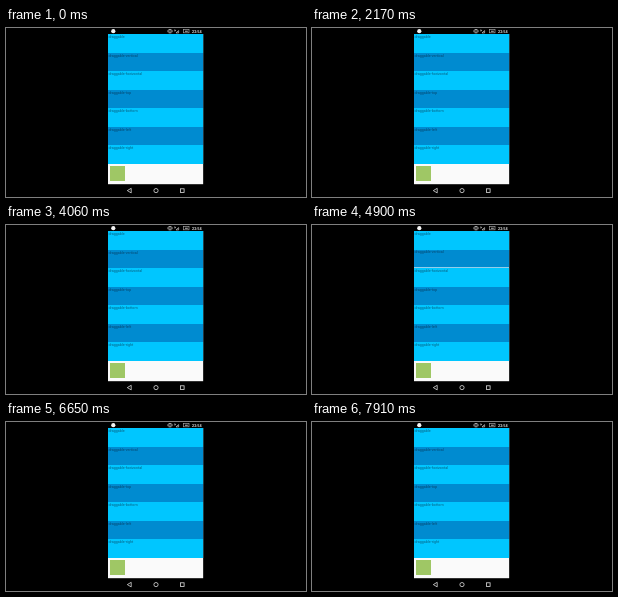
These frames come from a looping animation (300x169 px, 8000 ms). An HTML page with a canvas:

```html
<!DOCTYPE html>
<html lang="en">
<head>
<meta charset="utf-8">
<title>Draggable rows</title>
<style>
html, body { margin: 0; width: 100%; height: 100%; overflow: hidden; background: #000; }
canvas { display: block; width: 300px; height: 169px; }
</style>
</head>
<body>
<canvas id="stage"></canvas>
<script>
const LOOP = 8000;
const LEFT = 102, WIDTH = 95.4, TOP = 6, BOTTOM = 156.4;
const LIGHT = '#00c6ff', DARK = '#008bd0';
const labels = ['', '-vertical', '-horizontal', '-top', '-bottom', '-left', '-right']
  .map(s => 'draggable' + s);

// Drag paths per row: [time, dx, dy]
const drags = {
  0: [[2870, 0, 0], [3080, 13, -0.3], [3290, 29.5, -0.7], [3430, 24, -0.5], [3700, 0, 0]],
  1: [[4760, 0, 0], [4900, 0, -0.6], [5040, 0, 0]]
};

const canvas = document.getElementById('stage');
const ctx = canvas.getContext('2d');
const scale = window.devicePixelRatio || 1;
canvas.width = Math.round(300 * scale);
canvas.height = Math.round(169 * scale);

// Whole-pixel row edges keep the seams crisp
const edge = i => Math.round(6.2 + i * 18.5);

function rect(x, y, w, h, color) {
  ctx.fillStyle = color;
  ctx.fillRect(x, y, w, h);
}

function line(points, closed) {
  ctx.beginPath();
  points.forEach(([x, y]) => ctx.lineTo(x, y));
  if (closed) ctx.closePath();
  ctx.stroke();
}

function circle(x, y, r) {
  ctx.beginPath();
  ctx.arc(x, y, r, 0, Math.PI * 2);
}

function text(str, x, y, size, color, weight = 400) {
  ctx.font = `${weight} ${size}px Roboto, Arial, sans-serif`;
  ctx.fillStyle = color;
  ctx.fillText(str, x, y);
}

function offset(path, t) {
  if (!path) return [0, 0];
  for (let i = 1; i < path.length; i++) {
    const [t0, x0, y0] = path[i - 1], [t1, x1, y1] = path[i];
    if (t >= t0 && t <= t1) {
      const k = (t - t0) / (t1 - t0);
      return [x0 + (x1 - x0) * k, y0 + (y1 - y0) * k];
    }
  }
  return [0, 0];
}

function drawStatus() {
  ctx.fillStyle = '#f4f4f4';
  circle(107.3, 3.2, 2.1);
  ctx.fill();
  ctx.strokeStyle = '#c8c8c8';
  ctx.lineWidth = 0.7;
  ctx.strokeRect(163, 1.5, 2, 3.4);
  line([[161.9, 2.2], [161.9, 4.2]]);
  line([[166.1, 2.2], [166.1, 4.2]]);
  line([[168.8, 1.4], [168.8, 3.2], [170, 2.2]]);
  line([[170, 4.9], [172.6, 4.9], [172.6, 2.6]], true);
  ctx.strokeStyle = '#a0a0a0';
  ctx.strokeRect(177.6, 1.6, 5.4, 3.2);
  rect(179, 2.7, 2.8, 1.1, '#aaa');
  text('22:54', 186, 4.8, 3.8, '#fff', 500);
}

function drawNav() {
  ctx.strokeStyle = '#dcdcdc';
  ctx.lineWidth = 0.8;
  line([[121.3, 162.6], [125.2, 160.3], [125.2, 164.9]], true);
  circle(150, 162.6, 2.1);
  ctx.stroke();
  ctx.strokeRect(174.4, 160.8, 3.7, 3.7);
}

function drawRow(i, t) {
  const [dx, dy] = offset(drags[i], t);
  const x = LEFT + dx, y = edge(i) + dy;
  rect(x, y, WIDTH, edge(i + 1) - edge(i), i % 2 ? DARK : LIGHT);
  text(labels[i], x + 0.4, y + 4, 3.7, i % 2 ? '#06456c' : '#086080');
}

function draw(t) {
  ctx.setTransform(scale, 0, 0, scale, 0, 0);
  rect(0, 0, 300, 169, '#000');
  drawStatus();
  ctx.save();
  ctx.beginPath();
  ctx.rect(LEFT, TOP, WIDTH, BOTTOM - TOP);
  ctx.clip();
  rect(LEFT, TOP, WIDTH, BOTTOM - TOP, '#fafafa');
  for (let i = labels.length - 1; i >= 0; i--) drawRow(i, t);
  rect(104, 138, 15, 15, '#9fc765');
  ctx.restore();
  drawNav();
}

function tick() {
  draw(performance.now() % LOOP);
  requestAnimationFrame(tick);
}
tick();
</script>
</body>
</html>
```
